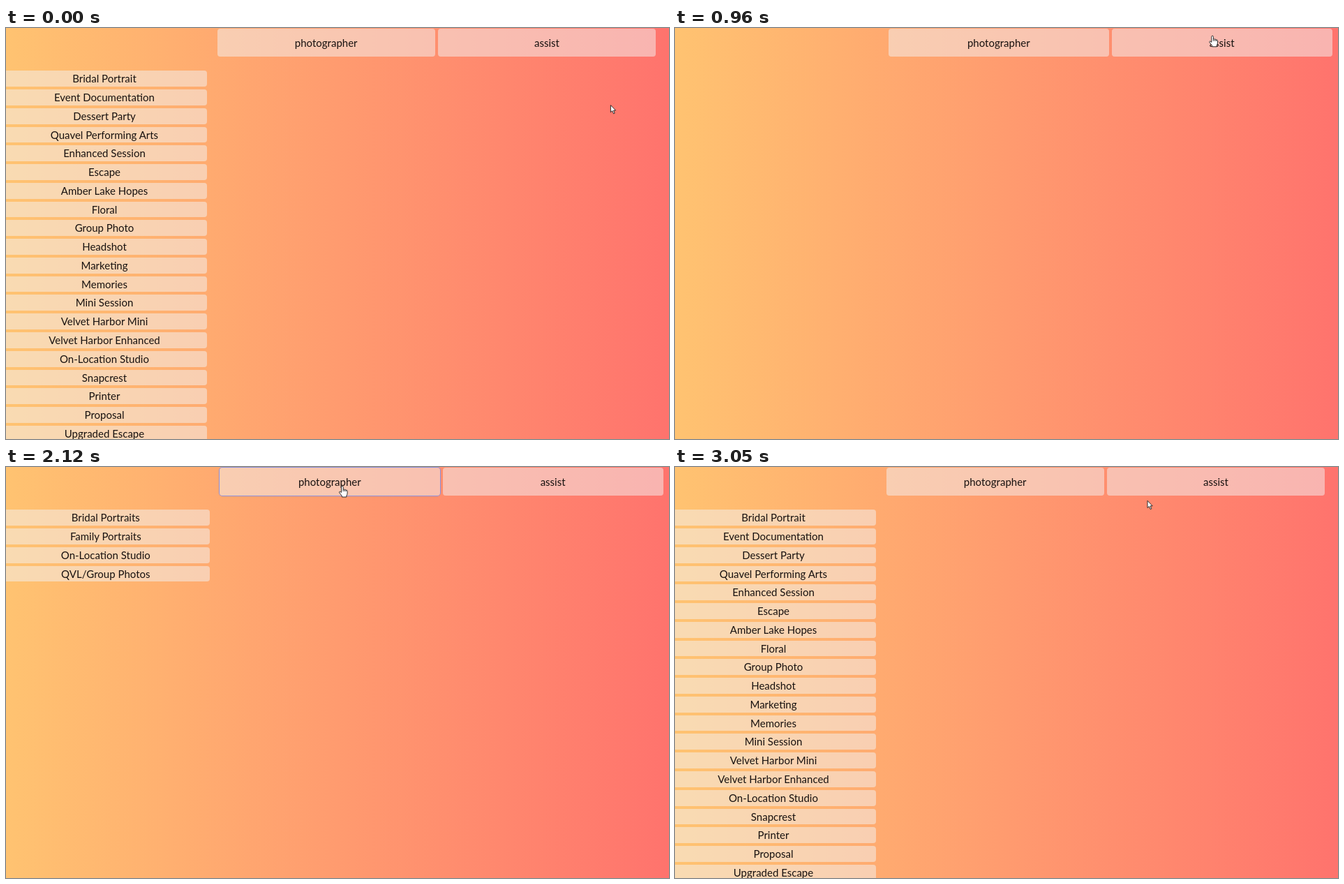
Recreate the animation shown at these times as an HTML page. Size 950x589 px, loop 3.13 s.

```html
<!DOCTYPE html>
<html lang="en">
<head>
<meta charset="utf-8">
<title>Session picker</title>
<style>
  html, body { margin: 0; width: 100%; height: 100%; overflow: hidden; }
  body {
    position: relative;
    background: linear-gradient(to right, #ffc371, #ff736d);
    font: 15px Lato, "Open Sans", sans-serif;
    color: #181210;
  }
  .tab, .item {
    position: absolute;
    box-sizing: border-box;
    border-radius: 4px;
    background: rgba(243, 243, 243, .5);
    text-align: center;
    white-space: nowrap;
  }
  .tab { top: .5px; height: 40px; line-height: 40px; width: 312px; }
  .item { left: -6px; width: 294px; height: 22.8px; line-height: 23px; }
  #photo { left: 302.7px; }
  #assist { left: 619px; }
  .wide .tab { width: 316px; }
  .wide .item { width: 297.6px; }
  .wide #photo { left: 305.8px; }
  .wide #assist { left: 625.6px; }
  .focus { box-shadow: 0 0 0 1px #8b8ed8; }
  svg { position: absolute; left: 0; top: 0; overflow: visible; }
  path { fill: #fff; stroke: #1a1a1a; stroke-width: .9; stroke-linejoin: round; }
</style>
</head>
<body>
<div class="tab" id="photo">photographer</div>
<div class="tab" id="assist">assist</div>
<div id="full"></div>
<div id="short"></div>
<svg id="cursor" width="1" height="1">
  <path id="arrow" d="M0 0V10.2L2.4 8.1 4.1 12.2 5.8 11.5 4.1 7.5H7.2Z"/>
  <path id="hand" d="M-1.2 9.4V1.7a1.3 1.3 0 0 1 2.6 0V5.3q1.2-.8 2.2.2 1.4-.5 2 .6 1.7-.2 1.8 1.2V10.6q0 2-1.2 3.4V16H-.4V14.4L-4 9.8q-.6-1.3.4-1.6 1-.2 2.4 1.6M1.4 5.3V8M3.6 5.6V8M5.6 6.2V8"/>
</svg>
<script>
const LOOP = 3130;
const $ = id => document.getElementById(id);
const sessions = {
  full: ["Bridal Portrait", "Event Documentation", "Dessert Party", "Quavel Performing Arts",
    "Enhanced Session", "Escape", "Amber Lake Hopes", "Floral", "Group Photo", "Headshot",
    "Marketing", "Memories", "Mini Session", "Velvet Harbor Mini", "Velvet Harbor Enhanced",
    "On-Location Studio", "Snapcrest", "Printer", "Proposal", "Upgraded Escape"],
  short: ["Bridal Portraits", "Family Portraits", "On-Location Studio", "QVL/Group Photos"]
};

for (const [id, names] of Object.entries(sessions)) {
  names.forEach((name, i) => {
    const item = document.createElement("div");
    item.className = "item";
    item.textContent = name;
    item.style.top = 61.2 + i * 26.77 + "px";
    $(id).append(item);
  });
}

// Pointer moves: start time, time per step, steps, end point
const home = [866.4, 110.6];
const moves = [
  [110, 70, 5, [789.4, 9.4]],
  [960, 40, 1, [770, 10.8]],
  [1000, 80, 4, [481.7, 31.4]],
  [1420, 76.6, 4, [481.7, 27]],
  [2730, 80, 5, [677, 48.3]]
];

const ease = p => p * p * (3 - 2 * p);
const within = (t, from, to) => t >= from && t < to;

function pointer(t) {
  let pos = home;
  for (const [start, step, count, end] of moves) {
    if (t < start) break;
    const p = ease(Math.min(1, (Math.floor((t - start) / step) + 1) / count));
    pos = pos.map((v, i) => v + (end[i] - v) * p);
  }
  return pos;
}

const show = (id, on) => { $(id).style.display = on ? "" : "none"; };

function draw(now) {
  const t = now % LOOP;
  document.body.classList.toggle("wide", within(t, 960, 2440));
  $("assist").classList.toggle("focus", within(t, 710, 960));
  $("photo").classList.toggle("focus", within(t, 2120, 2350));
  show("full", !within(t, 960, 2440));
  show("short", within(t, 1000, 2350));

  const [x, y] = pointer(t);
  $("cursor").style.transform = `translate(${x}px, ${y}px)`;
  show("hand", y < 40);
  show("arrow", y >= 40);
}

const begin = performance.now();
function tick() {
  draw(performance.now() - begin);
  requestAnimationFrame(tick);
}
tick();
</script>
</body>
</html>
```
